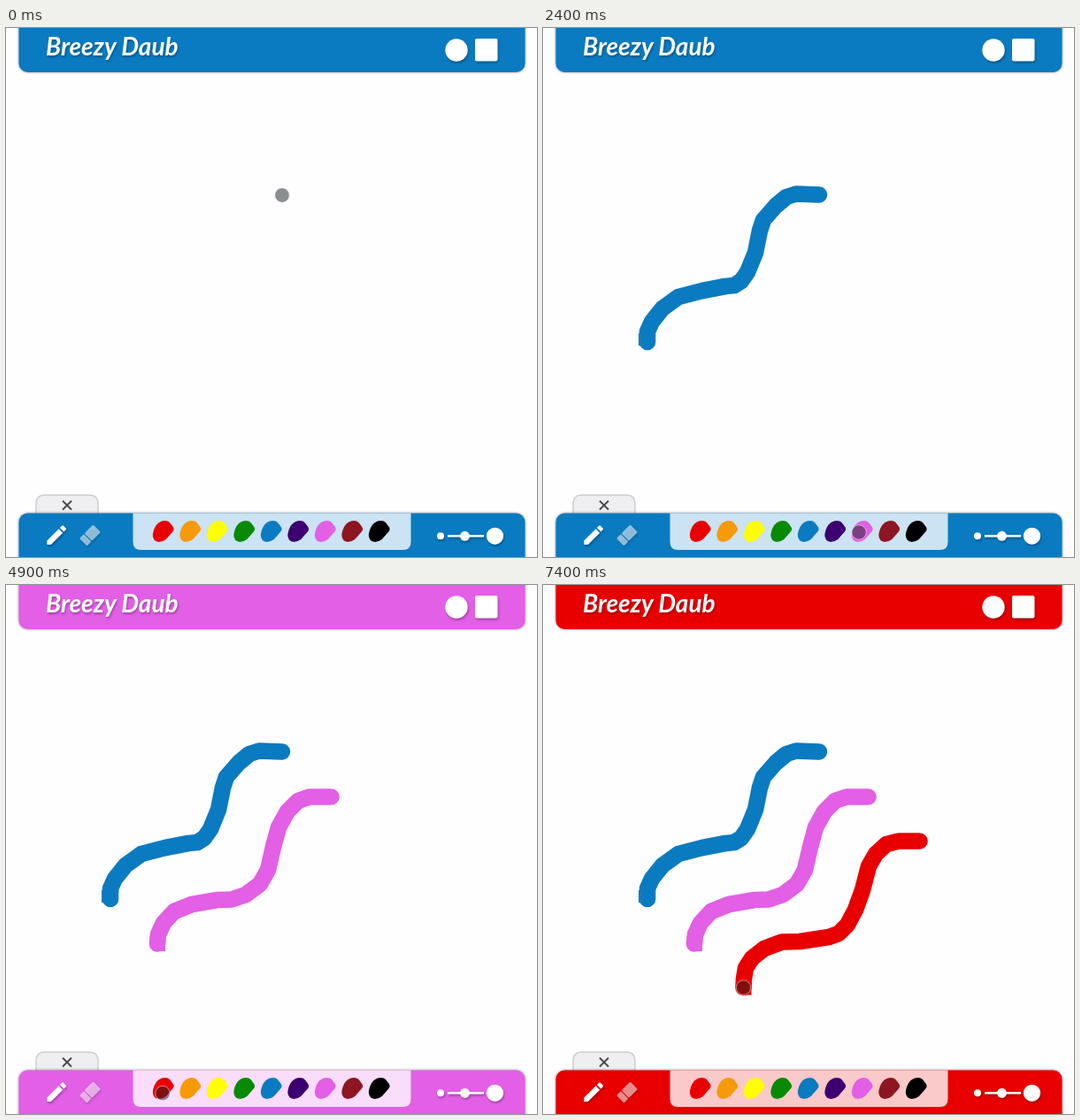
Animation of 600 by 598 pixels, one loop 7500 ms. Source, as an HTML page:

```html
<!DOCTYPE html>
<html lang="en">
<head>
<meta charset="utf-8">
<title>Drawing app</title>
<style>
  html, body { margin: 0; width: 100%; height: 100%; overflow: hidden; background: #fefdff; }
  svg { display: block; width: 600px; height: 598px; --theme: #0a7bc0; }
  .bar { fill: var(--theme); filter: drop-shadow(0 0 1.5px rgba(0, 0, 0, .45)); }
  .icons { fill: #fff; filter: drop-shadow(1px 2px 1px rgba(0, 0, 0, .28)); }
  .title { font: italic 700 28px Lato, sans-serif; }
  .stroke { fill: none; stroke-width: 18.6; stroke-linecap: round; stroke-linejoin: round; }
</style>
</head>
<body>
<svg id="stage" viewBox="0 0 600 598">
  <rect width="600" height="598" fill="#fefdff"/>
  <g id="strokes"></g>

  <rect class="bar" x="14.5" y="-20" width="572" height="70" rx="10"/>
  <g class="icons">
    <text class="title" x="45" y="31">Breezy Daub</text>
    <circle cx="509" cy="25" r="12.7"/>
    <rect x="530" y="12" width="25.5" height="25.5" rx="2"/>
  </g>

  <path d="M34 552V538Q34 528 44 528H94Q104 528 104 538V552Z" fill="#efeef0" stroke="#cfced0" stroke-width="1.5"/>
  <path d="M64 534.5l10 10m0-10l-10 10" stroke="#4a4a4a" stroke-width="2"/>
  <rect class="bar" x="14.5" y="548.5" width="572" height="70" rx="10"/>
  <path d="M143.5 548.5H457.5V581Q457.5 590 448.5 590H152.5Q143.5 590 143.5 581Z" fill="#fff" fill-opacity=".79"/>
  <g id="swatches"></g>

  <g class="icons">
    <path transform="translate(42.8 558.8) scale(1.2)" d="M3 17.25V21h3.75L17.81 9.94l-3.75-3.75L3 17.25zM20.71 7.04a1 1 0 000-1.41l-2.34-2.34a1 1 0 00-1.41 0l-1.83 1.83 3.75 3.75 1.83-1.83z"/>
    <g transform="translate(95 573.5) rotate(-45)" opacity=".55">
      <rect x="-11" y="-6" width="7" height="12" rx="1.5"/>
      <rect x="-3" y="-6" width="14" height="12" rx="1.5"/>
    </g>
    <path d="M499 574.3H540" stroke="#fff" stroke-width="2.6"/>
    <circle cx="491" cy="574.3" r="4"/>
    <circle cx="518.5" cy="574.3" r="5.5"/>
    <circle cx="552.5" cy="574.3" r="9.6"/>
  </g>

  <circle id="cursor" r="8.2" fill="rgba(24,32,32,.5)" stroke="rgba(255,255,255,.5)"/>
</svg>
<script>
const LOOP = 7500, STEP = 100;
const BLUE = '#0a7bc0', PINK = '#e25fe6', RED = '#e80000';
const $ = id => document.getElementById(id);

function add(parent, tag, attrs) {
  const el = document.createElementNS('http://www.w3.org/2000/svg', tag);
  for (const key in attrs) el.setAttribute(key, attrs[key]);
  return parent.appendChild(el);
}

[RED, '#f79a09', '#ffff00', '#088a04', BLUE, '#3c0070', PINK, '#8e1522', '#000'].forEach((fill, i) =>
  add($('swatches'), 'path', {
    fill, transform: `translate(${177.8 + 30.5 * i} 569)`,
    d: 'M-8-7Q-4-12 2-12Q6-12 8-9L11-5Q13-2 10 1L3 9Q-1 12-5 12Q-12 11-12 4Q-11-3-8-7Z'
  }));

// Each stroke ends in a small square blot.
const strokes = [
  { color: BLUE, from: 100, to: 1500, blot: 'M108 345h10v14h-10z',
    d: 'M312 188.5L286 187.5 275 191 263 201 249 217 245 229 240 254 231 276 224 286 216 291 206 292 180 297 153 304 135 317 123 332 118 343 118 355' },
  { color: PINK, from: 3200, to: 4250, blot: 'M162.5 397h9v9h-9zM171 405h9v9h-9z',
    d: 'M367.5 239.5L343 239.5 330 244 318 256 308 274 302 296 296 322 287 338 271 350 255 355.5 239 356 210 361 190 369 178 382 172 395 171 405.5' },
  { color: RED, from: 5700, to: 6700, blot: 'M226 454h9.5v9.5h-9.5z',
    d: 'M425.5 289.5L402 289.5 388 293 376 304 368 318 361 345 353 367 344 384 334 394 323 398 290 403 270 403.5 250 411 236 422 229 433 227 445 226.5 455' }
];
for (const s of strokes) {
  s.line = add($('strokes'), 'path', { class: 'stroke', stroke: s.color, d: s.d });
  s.end = add($('strokes'), 'path', { fill: s.color, d: s.blot });
  s.length = s.line.getTotalLength();
}

// Cursor trips between the palette and the canvas.
const trips = [
  { from: 1600, to: 2400, a: [118, 355], b: [357, 570] },
  { from: 2600, to: 3150, a: [357, 570], b: [367.5, 239.5] },
  { from: 4300, to: 4850, a: [171, 405.5], b: [177, 574.5] },
  { from: 5000, to: 5500, a: [177, 574.5], b: [425, 289.5] }
];

function ease(t, { from, to }) {
  const u = Math.min(1, Math.max(0, (t - from) / (to - from)));
  return (1 - Math.cos(Math.PI * u)) / 2;
}

function draw(t) {
  let pos = [312, 189], latest = 0;
  const moveTo = (from, point) => {
    if (t >= from && from > latest) [pos, latest] = [point, from];
  };
  for (const s of strokes) {
    const p = ease(t, s), started = t >= s.from;
    s.line.style.display = started ? '' : 'none';
    s.line.setAttribute('stroke-dasharray', `${p * s.length + .01} 2000`);
    s.end.style.display = p > .97 ? '' : 'none';
    const { x, y } = s.line.getPointAtLength(p * s.length);
    moveTo(s.from, [x, y]);
  }
  for (const trip of trips) {
    const p = ease(t, trip);
    moveTo(trip.from, trip.a.map((v, i) => v + (trip.b[i] - v) * p));
  }
  $('cursor').setAttribute('transform', `translate(${pos})`);
  $('stage').style.setProperty('--theme', t < 2600 ? BLUE : t < 5000 ? PINK : RED);
}

const start = performance.now();
function tick() {
  const t = (performance.now() - start) % LOOP;
  draw(Math.floor(t / STEP) * STEP);
  requestAnimationFrame(tick);
}
tick();
</script>
</body>
</html>
```
